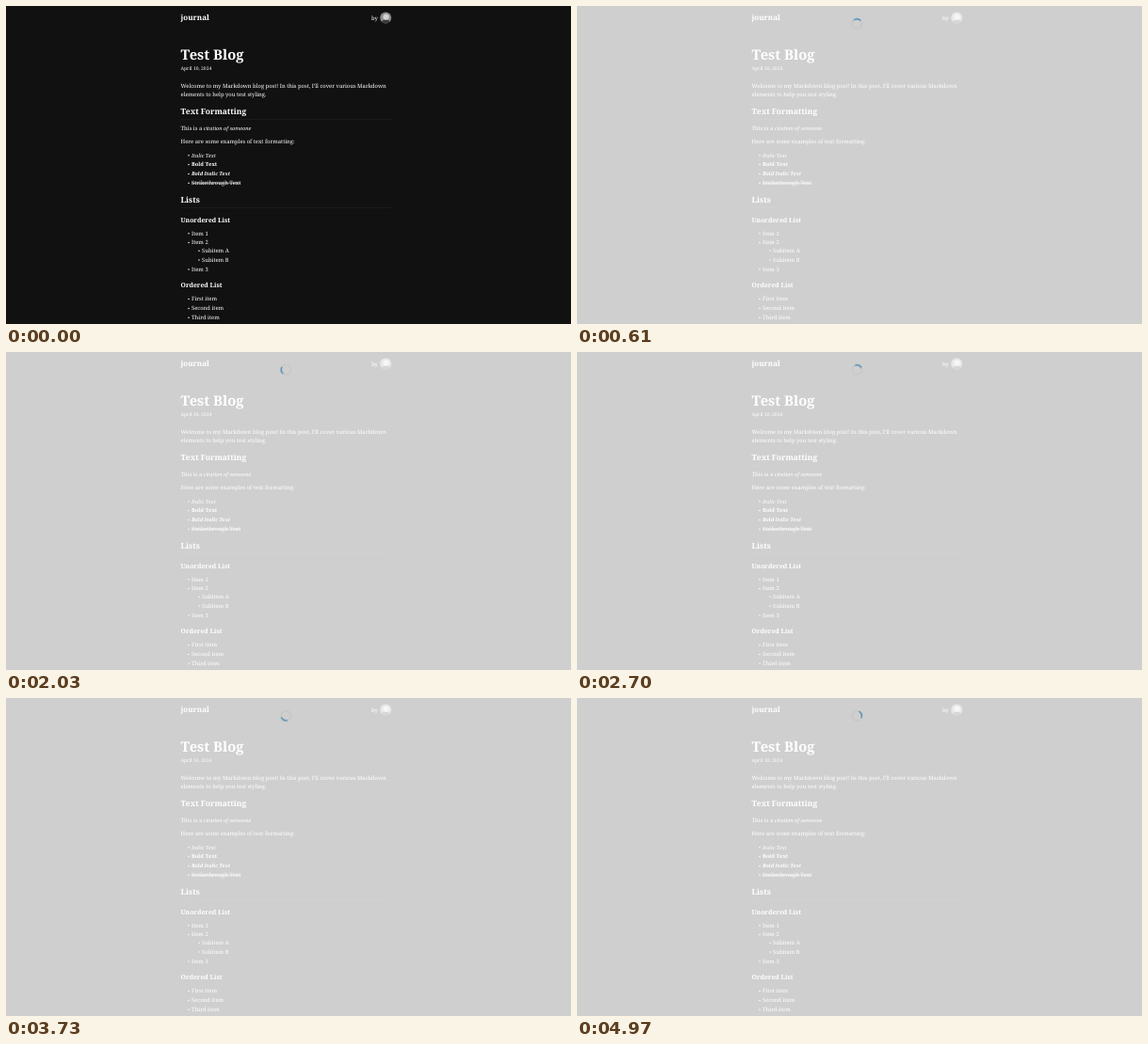
An HTML page for the animation above (5000 ms loop, 600 by 338 pixels).

```html
<!DOCTYPE html>
<html lang="en">
<head>
<meta charset="utf-8">
<title>journal</title>
<style>
  html, body { margin: 0; width: 100%; height: 100%; overflow: hidden; background: #111; }
  svg { display: block; width: 600px; height: 338px; }
  text { font: 5.87px "Noto Serif", serif; fill: #fff; text-rendering: geometricPrecision; white-space: pre; }
  .brand { font-size: 8.05px; font-weight: 700; }
  .h1 { font-size: 14.75px; font-weight: 700; }
  .h2 { font-size: 8.5px; font-weight: 700; }
  .h3 { font-size: 6.85px; font-weight: 700; }
  .date { font-size: 5px; }
  .b { font-size: 5.67px; font-weight: 700; }
  .i { font-size: 5.57px; font-style: italic; }
  .bi { font-size: 5.4px; font-weight: 700; font-style: italic; letter-spacing: -.05px; }
  .s { text-decoration: line-through; }
</style>
</head>
<body>
<svg viewBox="0 0 600 338">
  <defs>
    <clipPath id="round"><circle cx="403.2" cy="12.5" r="6"/></clipPath>
  </defs>
  <rect width="600" height="338" fill="#111"/>
  <path d="M185.5 120.5H409M185.5 214.5H409" stroke="#222" stroke-width=".6"/>
  <g id="page"></g>
  <g clip-path="url(#round)">
    <rect x="397" y="6" width="13" height="13" fill="#8c8c8c"/>
    <ellipse cx="403.4" cy="18.8" rx="5" ry="4.2" fill="#3a3a3a"/>
    <circle cx="403.6" cy="11.6" r="3.2" fill="#d2d2d2"/>
  </g>
  <g id="overlay" opacity="0">
    <rect width="600" height="338" fill="#fff"/>
    <g transform="translate(297.3 18.9)">
      <g id="spinner" fill="none" stroke-width="1.2">
        <circle r="5.2" stroke="#f3f3f3"/>
        <path d="M-3.68 -3.68A5.2 5.2 0 0 1 3.68 -3.68" stroke="#3498db"/>
      </g>
    </g>
  </g>
</svg>
<script>
  const NS = 'http://www.w3.org/2000/svg';
  const page = document.getElementById('page');
  const LEFT = 185.5, ITEM = 197, SUB = 208;

  function add(parent, tag, attrs, text = '') {
    const el = document.createElementNS(NS, tag);
    for (const key in attrs) el.setAttribute(key, attrs[key]);
    el.textContent = text;
    return parent.appendChild(el);
  }

  const line = (y, text, cls = '', x = LEFT) =>
    add(page, 'text', { x, y, class: cls }, text);

  function item(y, text, cls = '', x = ITEM) {
    add(page, 'circle', { cx: x - 3, cy: y - 1.8, r: 0.75, fill: '#fff' });
    line(y, text, cls, x);
  }

  line(15.2, 'journal', 'brand');
  line(14.6, 'by', '', 388);
  line(57, 'Test Blog', 'h1');
  line(67.7, 'April 10, 2024', 'date');
  line(87.3, 'Welcome to my Markdown blog post! In this post, I’ll cover various Markdown');
  line(95.9, 'elements to help you test styling.');

  line(114.6, 'Text Formatting', 'h2');
  add(line(132.2, 'This is a '), 'tspan', { class: 'i' }, 'citation of someone')
    .style.cssText = 'font-size:5.57px;font-style:italic';
  line(146.4, 'Here are some examples of text formatting:');
  item(160.5, 'Italic Text', 'i');
  item(170.4, 'Bold Text', 'b');
  item(180.3, 'Bold Italic Text', 'bi');
  item(190.1, 'Strikethrough Text', 's');

  line(208.9, 'Lists', 'h2');
  line(229.6, 'Unordered List', 'h3');
  item(243.5, 'Item 1');
  item(253.4, 'Item 2');
  item(262, 'Subitem A', '', SUB);
  item(271.9, 'Subitem B', '', SUB);
  item(281.9, 'Item 3');
  line(299.3, 'Ordered List', 'h3');
  item(313.4, 'First item');
  item(323.3, 'Second item');
  item(333.1, 'Third item');

  // The overlay appears at once; the spinner makes one turn every 2 s.
  const LOOP = 5000, SHOW = 610 / LOOP, START = -104;
  const timing = { duration: LOOP, iterations: Infinity };

  document.getElementById('overlay').animate([
    { opacity: 0, offset: 0 },
    { opacity: 0, offset: SHOW },
    { opacity: 0.8, offset: SHOW },
    { opacity: 0.8, offset: 1 }
  ], timing);

  document.getElementById('spinner').animate([
    { transform: `rotate(${START}deg)` },
    { transform: `rotate(${START + 360 * LOOP / 2000}deg)` }
  ], timing);
</script>
</body>
</html>
```
